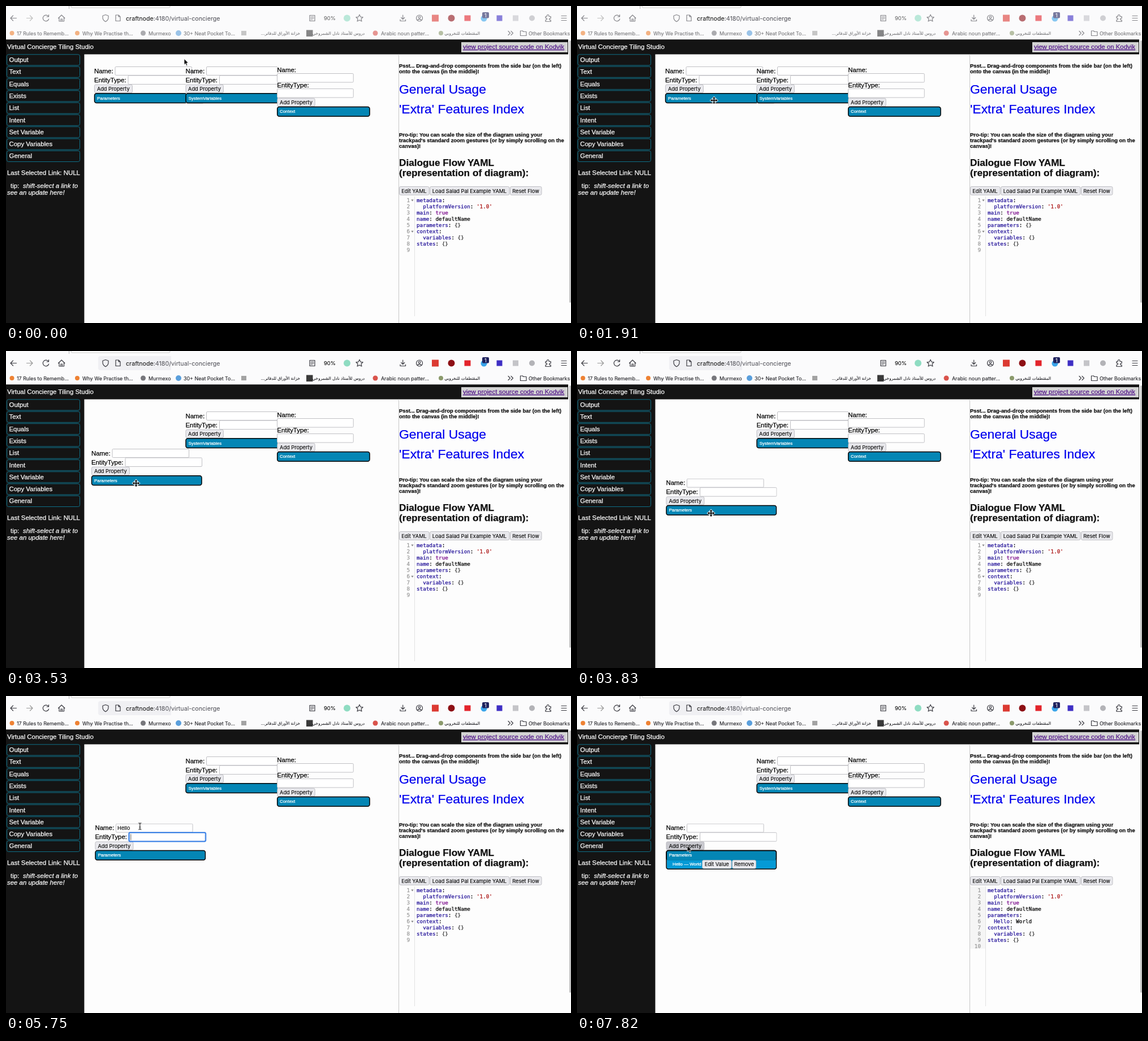
Recreate the animation shown at these times as an HTML page. Size 999 px wide and 561 px high, loop 8 s.

```html
<!DOCTYPE html>
<html lang="en">
<head>
<meta charset="utf-8">
<title>Dialogue canvas</title>
<style>
html, body { margin: 0; width: 100%; height: 100%; overflow: hidden; background: #fdfdfd; }
svg { display: block; width: 999px; height: 561px; color: #000; font: 11.43px "Liberation Sans", sans-serif; }

/* a hairline stroke gives the text its slightly heavy smoothing */
text { white-space: pre; fill: currentColor; stroke: currentColor; stroke-width: .25px; }
tspan { fill: currentColor; stroke: currentColor; }
.ui, .mark, .ar, .btn text { stroke-width: .1px; }

.ui { font-family: Inter, sans-serif; font-size: 9.3px; }
.mark { font-family: Inter, sans-serif; font-size: 8.9px; color: #1c1c20; }
.ar { font-family: "DejaVu Sans", sans-serif; font-size: 7.3px; color: #1c1c20; direction: rtl; }
.url { font-size: 10.7px; color: #222; }
.path { color: #5c5c63; }
.line { fill: none; stroke: #3b3b42; stroke-width: 1.2; stroke-linecap: round; stroke-linejoin: round; }
.side rect { fill: #141414; stroke: #0f7088; }
.light { color: #fff; }
.visited { color: #551a8b; text-decoration: underline; }
.h5 { font-weight: bold; font-size: 9.42px; color: #111; }
.h2 { font-weight: bold; font-size: 17.2px; color: #111; }
.big { font-size: 22.9px; color: #00e; }
.btn rect { fill: #e9e9ed; stroke: #b4b4ba; stroke-width: .8; }
.btn text { font: 9.2px Inter, sans-serif; text-anchor: middle; }
.field { fill: #fff; stroke: #b9b9be; stroke-width: .9; }
.head { fill: #0486b5; stroke: #000; stroke-width: 1.5; }
.cap { font-size: 7.9px; color: #fff; }
.ring { fill: none; stroke: #1169e6; stroke-width: 1.8; }
.caret { fill: #222; }
.code { font: 9.27px "DejaVu Sans Mono", monospace; }
.no { color: #999; text-anchor: end; }
.key { color: #219; } .str { color: #a11; } .bool { color: #708; } .punc { color: #333; }

/* 1% = 80 ms */
.a { animation: 8s step-end infinite; }
.chrome { animation-name: chrome; }
.focusbar { animation-name: after-focus; }
.drag { animation-name: drag; }
.pointer { animation-name: pointer; }
.arrow { animation-name: arrow; }
.cross { animation-name: cross; }
.beam { animation-name: beam; }
.ring1 { animation-name: ring1; }
.ring2 { animation-name: ring2; }
.type1 { animation-name: type1; }
.type2 { animation-name: type2; }
.caret1 { animation-name: ring1; }
.caret2 { animation-name: caret2; }
.hover { animation-name: hover; }
.before { animation-name: before; }
.after { animation-name: after; }

@keyframes chrome { 0% { opacity: .6 } 25.75%, 100% { opacity: 1 } }
@keyframes after-focus { 0% { visibility: hidden } 25.75%, 100% { visibility: visible } }
@keyframes drag {
  0% { transform: none }
  42.25% { transform: translate(-3px, 24px) }
  44.125% { transform: translate(-5px, 66px) }
  46% { transform: translate(-1px, 104px) }
  47.875%, 100% { transform: translate(1.5px, 118.7px) }
}
@keyframes pointer {
  0% { transform: translate(315px, 93.5px) }
  1.875% { transform: translate(328px, 104px) }
  3.625% { transform: translate(301px, 130px) }
  5.5% { transform: translate(260px, 155px) }
  7.25% { transform: translate(239px, 162px) }
  10.875% { transform: translate(245px, 167px) }
  12.75% { transform: translate(249px, 173px) }
  14.5% { transform: translate(246px, 169px) }
  23.875% { transform: translate(242.3px, 167px) }
  25.75% { transform: translate(239px, 172px) }
  27.5% { transform: translate(236px, 205px) }
  29.375% { transform: translate(236px, 228px) }
  33% { transform: translate(236px, 218px) }
  34.875% { transform: translate(235px, 197px) }
  36.75% { transform: translate(235.3px, 179px) }
  38.625% { transform: translate(235.3px, 167.5px) }
  42.25% { transform: translate(232px, 192px) }
  44.125% { transform: translate(230px, 234px) }
  46% { transform: translate(234px, 272px) }
  47.875% { transform: translate(237px, 287px) }
  49.625% { transform: translate(238px, 257px) }
  51.5% { transform: translate(236.7px, 230.5px) }
  86.625% { transform: translate(222px, 239px) }
  88.5% { transform: translate(204px, 251px) }
  90.375% { transform: translate(198.3px, 258px) }
  92.25% { transform: translate(197px, 263px) }
  94%, 100% { transform: translate(195px, 265px) }
}
@keyframes arrow { 0% { visibility: visible } 7.25% { visibility: hidden } 92.25%, 100% { visibility: visible } }
@keyframes cross {
  0% { visibility: hidden } 7.25% { visibility: visible } 51.5% { visibility: hidden }
  88.5% { visibility: visible } 92.25%, 100% { visibility: hidden }
}
@keyframes beam { 0% { visibility: hidden } 51.5% { visibility: visible } 88.5%, 100% { visibility: hidden } }
@keyframes ring1 { 0% { visibility: hidden } 55.125% { visibility: visible } 71.875%, 100% { visibility: hidden } }
@keyframes ring2 { 0% { visibility: hidden } 71.875% { visibility: visible } 97.75%, 100% { visibility: hidden } }
@keyframes caret2 { 0% { visibility: hidden } 71.875% { visibility: visible } 86.625%, 100% { visibility: hidden } }
@keyframes type1 {
  0% { transform: none }
  62.625% { transform: translateX(7px) }
  64.5% { transform: translateX(15px) }
  66.25% { transform: translateX(17.4px) }
  70% { transform: translateX(23.6px) }
  97.75%, 100% { transform: none }
}
@keyframes type2 {
  0% { transform: none }
  77.5% { transform: translateX(9.4px) }
  79.25% { transform: translateX(15px) }
  81.125% { transform: translateX(20.8px) }
  82.875% { transform: translateX(26.6px) }
  97.75%, 100% { transform: none }
}
@keyframes hover { 0% { fill: #e9e9ed } 92.25% { fill: #d0d0d7 } 97.75%, 100% { fill: #c9c9cf } }
@keyframes before { 0% { visibility: visible } 97.75%, 100% { visibility: hidden } }
@keyframes after { 0% { visibility: hidden } 97.75%, 100% { visibility: visible } }
</style>
</head>
<body>
<svg viewBox="0 0 999 561">
  <rect width="999" height="561" fill="#fdfdfd"/>

  <!-- browser bars -->
  <rect width="999" height="60" fill="#fbfbfc"/>
  <path d="M115 0v1q0 2 2 2h171q2 0 2-2V0" fill="#fff" stroke="#ccc"/>
  <path d="M111.500 0v5" stroke="#bbb"/>
  <path class="a focusbar" d="M292 9H167q-4 0-4 4v17q0 4 4 4h125z" fill="#f0f0f3"/>
  <g class="a chrome">
    <g class="line">
      <path d="M18.500 21.500H8m4.500-4.500L8 21.500l4.500 4.500"/>
      <path d="M36.500 21.500H47m-4.500-4.500 4.500 4.500-4.500 4.500" stroke="#999"/>
      <path d="M75 18.500a5.300 5.300 0 1 0 .7 4.500M75.500 15.500v3.500H72"/>
      <path d="M92.500 21.500l5.700-5.500 5.700 5.500M94 20.500V27h8.500v-6.500M97 27v-4h2.500v4"/>
      <path d="M176 15.500l5 1.800v3.200q0 4.500-5 7.200-5-2.700-5-7.200v-3.200z"/>
      <path d="M194 16h5l3 3v7.500h-8zM199 16v3h3"/>
      <path d="M537 16.500h9v10h-9zM539 19h5m-5 2.500h5m-5 2.500h3"/>
      <path d="M625 15.300l1.900 4 4.300.5-3.200 3 .9 4.300-3.900-2.200-3.900 2.200.9-4.300-3.200-3 4.300-.5z"/>
      <path d="M701.700 16v7.500m-3-3 3 3 3-3M697 24v2.500h9.500V24"/>
      <circle cx="731" cy="21.500" r="5.500"/>
      <circle cx="731" cy="19.800" r="1.800"/>
      <path d="M727.500 25q3.500-3.500 7 0"/>
      <path d="M954 18.500h2.500q-.5-3 1.700-3t1.700 3h3.300v3.200q-2.700-.3-2.700 1.600t2.700 1.600v2.600H954v-3q2.500.2 2.500-1.600t-2.500-1.500z"/>
      <path d="M982 17.500h9m-9 4h9m-9 4h9"/>
      <path d="M888 44.500l3.500 3.500-3.500 3.500m5-7 3.500 3.500-3.500 3.500"/>
      <path d="M909.500 44h4l1.300 1.500h5.200v7h-10.500z"/>
    </g>
    <circle cx="603" cy="21.500" r="6" fill="#8fdcc2"/>
    <rect x="753" y="15.500" width="12" height="12" fill="#dc3a32"/>
    <circle cx="787.500" cy="21.500" r="6" fill="#8d0f14"/>
    <rect x="810.500" y="16.500" width="11" height="10" fill="#e3242b"/>
    <circle cx="845" cy="22" r="5.500" fill="#3aa5ea"/>
    <rect x="842" y="11" width="12" height="10.500" rx="2" fill="#20235f"/>
    <text class="ui light" x="846" y="19.500">1</text>
    <rect x="867.500" y="16.500" width="10" height="10" fill="#3f2fc4"/>
    <rect x="896" y="16.500" width="10" height="10" fill="#c4c4c8"/>
    <circle cx="930" cy="21.500" r="5" fill="#b3b3b7"/>
    <text class="ui" x="562" y="24.800">90%</text>

    <circle cx="10.500" cy="48" r="4" fill="#ee8234"/>
    <text class="mark" x="19" y="51.500">17 Rules to Rememb...</text>
    <circle cx="126" cy="48" r="4" fill="#ee8234"/>
    <text class="mark" x="135" y="51.500">Why We Practise th...</text>
    <circle cx="242.500" cy="48" r="4.500" fill="#77777c"/>
    <text class="mark" x="252" y="51.500">Murmexo</text>
    <circle cx="305" cy="48" r="5" fill="#5a9fdc"/>
    <text class="mark" x="314" y="51.500">30+ Neat Pocket To...</text>
    <rect x="416" y="44" width="9" height="8" fill="#a3a3a3"/>
    <text class="ar" x="520" y="51">خزانة الأوراق للدفاتر...</text>
    <rect x="531" y="42.500" width="11.500" height="11.500" fill="#3a3a3a"/>
    <text class="ar" x="634" y="51">دروس للأستاذ نادل الشمروخي...</text>
    <circle cx="653" cy="48" r="4.500" fill="#d9534c"/>
    <text class="mark" x="663" y="51.500">Arabic noun patter...</text>
    <circle cx="769" cy="48" r="4" fill="#8b9a6c"/>
    <text class="ar" x="838" y="51">المقتطفات للنخروبي</text>
    <text class="mark" x="924" y="51.500">Other Bookmarks</text>
  </g>
  <text class="ui url" x="212" y="25.500">craftnode<tspan class="path">:4180/virtual-concierge</tspan></text>

  <!-- page header and side bar -->
  <path d="M0 59.300H994V85.500H138.400V561H0z" fill="#141414"/>
  <text class="light" x="2" y="76">Virtual Concierge Tiling Studio</text>
  <rect x="805" y="64" width="188" height="18" fill="#d3d3d3"/>
  <text class="visited" x="808" y="76">view project source code on Kodvik</text>
  <g class="side" id="side"></g>
  <g class="light">
    <text x="2" y="298.500">Last Selected Link: NULL</text>
    <text x="8" y="321.500">tip:</text>
    <g font-style="italic">
      <text x="30" y="321.500">shift-select a link to</text>
      <text x="2" y="333.500">see an update here!</text>
    </g>
  </g>

  <!-- right panel -->
  <path d="M694.500 85.500V561" stroke="#c8c8c8"/>
  <rect x="996" y="61" width="3" height="464" rx="1.500" fill="#c1c1c1"/>
  <g class="h5">
    <text x="695" y="109.300">Psst... Drag-and-drop components from the side bar (on the left)</text>
    <text x="695" y="119">onto the canvas (in the middle)!</text>
    <text x="695" y="231.300">Pro-tip: You can scale the size of the diagram using your</text>
    <text x="695" y="241">trackpad's standard zoom gestures (or by simply scrolling on the</text>
    <text x="695" y="250.700">canvas)!</text>
  </g>
  <text class="big" x="695" y="155">General Usage</text>
  <text class="big" x="695" y="190.200">'Extra' Features Index</text>
  <text class="h2" x="695" y="283">Dialogue Flow YAML</text>
  <text class="h2" x="695" y="301">(representation of diagram):</text>
  <g class="btn">
    <rect x="695.500" y="319.500" width="52.500" height="15" rx="2.500"/><text x="721.500" y="330.700">Edit YAML</text>
    <rect x="749.500" y="319.500" width="140.500" height="15" rx="2.500"/><text x="819.500" y="330.700">Load Salad Pal Example YAML</text>
    <rect x="891.500" y="319.500" width="55.500" height="15" rx="2.500"/><text x="919" y="330.700">Reset Flow</text>
  </g>
  <rect class="a after" x="695" y="337" width="27" height="110" fill="#f5f5f5"/>
  <path d="M722.500 337V549" stroke="#e2e2e2"/>
  <g class="code a before" id="yaml1"></g>
  <g class="code a after" id="yaml2"></g>
  <path class="a before" d="M716.300 342.500h4.400l-2.200 3.200zm0 55.300h4.400l-2.200 3.200z" fill="#888"/>

  <!-- draggable node -->
  <g class="a drag">
    <text x="156" y="118.500">Name:</text>
    <text x="156" y="134.500">EntityType:</text>
    <rect class="field" x="193" y="107.500" width="135.500" height="15" rx="1.500"/>
    <rect class="field" x="216" y="123" width="135.500" height="15.500" rx="1.500"/>
    <g class="btn"><rect class="a hover" x="156.400" y="139.200" width="67" height="14.500" rx="2.500"/><text x="189.800" y="150">Add Property</text></g>
    <rect class="head" x="156.500" y="154.800" width="194.500" height="16.700" rx="3.500"/>
    <text class="cap" x="161" y="165.500">Parameters</text>

    <g class="a after">
      <path d="M157.300 171.500h193v13.500q0 2-2 2H159.300q-2 0-2-2z" fill="#059ad6"/>
      <rect x="157.300" y="170" width="193" height="2" fill="#0486b5"/>
      <rect class="head" x="156.500" y="154.800" width="194.500" height="32.700" rx="3.500" style="fill:none"/>
      <text class="cap" x="167.500" y="181.700">Hello — World</text>
      <g class="btn">
        <rect x="220" y="171.800" width="51.500" height="14.800" rx="2.500"/><text x="245.700" y="182.700">Edit Value</text>
        <rect x="273" y="171.800" width="42" height="14.800" rx="2.500"/><text x="294" y="182.700">Remove</text>
      </g>
    </g>

    <g class="a before">
      <text class="ui" x="195.500" y="118.600">Hello</text>
      <text class="ui" x="218.500" y="134.400">World</text>
    </g>
    <g class="a type1">
      <rect x="195" y="109" width="30" height="12" fill="#fff"/>
      <rect class="caret a caret1" x="195.500" y="109.500" width=".8" height="11"/>
    </g>
    <g class="a type2">
      <rect x="218" y="125" width="32" height="11.500" fill="#fff"/>
      <rect class="caret a caret2" x="218.700" y="125.500" width=".8" height="11"/>
    </g>
    <rect class="ring a ring1" x="192.800" y="107" width="136" height="16" rx="2"/>
    <rect class="ring a ring2" x="216" y="122.800" width="135.500" height="15.800" rx="2"/>
  </g>

  <!-- fixed nodes -->
  <path d="M318 123.200h162v49H318z" fill="#fdfdfd"/>
  <text x="317.500" y="118.500">Name:</text>
  <text x="317.500" y="134.500">EntityType:</text>
  <rect class="field" x="354.500" y="107.500" width="135.500" height="15" rx="1.500"/>
  <rect class="field" x="377.500" y="123" width="135.500" height="15.500" rx="1.500"/>
  <g class="btn"><rect x="317.900" y="139.200" width="66.500" height="14.500" rx="2.500"/><text x="351" y="150">Add Property</text></g>
  <rect class="head" x="318" y="154.800" width="194.500" height="16.700" rx="3.500"/>
  <text class="cap" x="322.500" y="165.500">SystemVariables</text>

  <path d="M480 104h164v75H480z" fill="#fdfdfd"/>
  <text x="479.300" y="117">Name:</text>
  <rect class="field" x="479.500" y="119.500" width="134.700" height="15.500" rx="1.500"/>
  <text x="479.300" y="144">EntityType:</text>
  <rect class="field" x="479.500" y="146.500" width="134.700" height="15.500" rx="1.500"/>
  <g class="btn"><rect x="479.700" y="163.300" width="66.500" height="14.500" rx="2.500"/><text x="513" y="174">Add Property</text></g>
  <rect class="head" x="479.700" y="178.600" width="163.300" height="16.700" rx="3.500"/>
  <text class="cap" x="484" y="189.300">Context</text>

  <!-- pointer shapes, origin at the hot spot -->
  <g class="a pointer">
    <path class="a arrow" d="M0 0v10.500l2.400-2.200 1.700 3.900 1.800-.8-1.700-3.800h3.500z" fill="#000" stroke="#fff" stroke-width=".8"/>
    <path class="a cross" d="M0-6.300 2.400-3.500H.8v2.700h2.700v-1.600L6.300 0 3.500 2.400V.8H.8v2.700h1.600L0 6.300l-2.400-2.800h1.600V.8h-2.700v1.600L-6.300 0l2.800-2.400v1.600h2.700v-2.700h-1.600z" fill="#000" stroke="#fff" stroke-width="1.600" paint-order="stroke"/>
    <path class="a beam" d="M-2.600-5.800q2.600 0 2.600 1.500 0-1.500 2.600-1.500M0-4.300v8.600m-2.600 1.500q2.600 0 2.600-1.500 0 1.500 2.600 1.500M-1.300 1.500h2.600" fill="none" stroke="#111" stroke-width="1.100"/>
  </g>
</svg>
<script>
const put = (id, markup) => { document.getElementById(id).innerHTML = markup; };

const parts = ['Output', 'Text', 'Equals', 'Exists', 'List', 'Intent', 'Set Variable', 'Copy Variables', 'General'];
put('side', parts.map((name, i) => {
  const y = 85.8 + i * 21.3;
  return `<rect x="1.5" y="${y}" width="129" height="19.3" rx="3"/><text class="light" x="5.5" y="${y + 13.2}">${name}</text>`;
}).join(''));

// Each row: indent level, key, value, value class
const yaml = (id, rows) => put(id, rows.map(([level, key, value = '', kind = 'punc'], i) => {
  const y = 346.8 + i * 11.07;
  const body = key ? `<text x="${726 + level * 11.16}" y="${y}"><tspan class="key">${key}</tspan>: <tspan class="${kind}">${value}</tspan></text>` : '';
  return `<text class="no" x="714" y="${y}">${i + 1}</text>${body}`;
}).join(''));

const top4 = [[0, 'metadata'], [1, 'platformVersion', "'1.0'", 'str'], [0, 'main', 'true', 'bool'], [0, 'name', 'defaultName', 'plain']];
const tail = [[0, 'context'], [1, 'variables', '{}'], [0, 'states', '{}'], [0]];
yaml('yaml1', [...top4, [0, 'parameters', '{}'], ...tail]);
yaml('yaml2', [...top4, [0, 'parameters'], [1, 'Hello', 'World', 'plain'], ...tail]);
</script>
</body>
</html>
```
